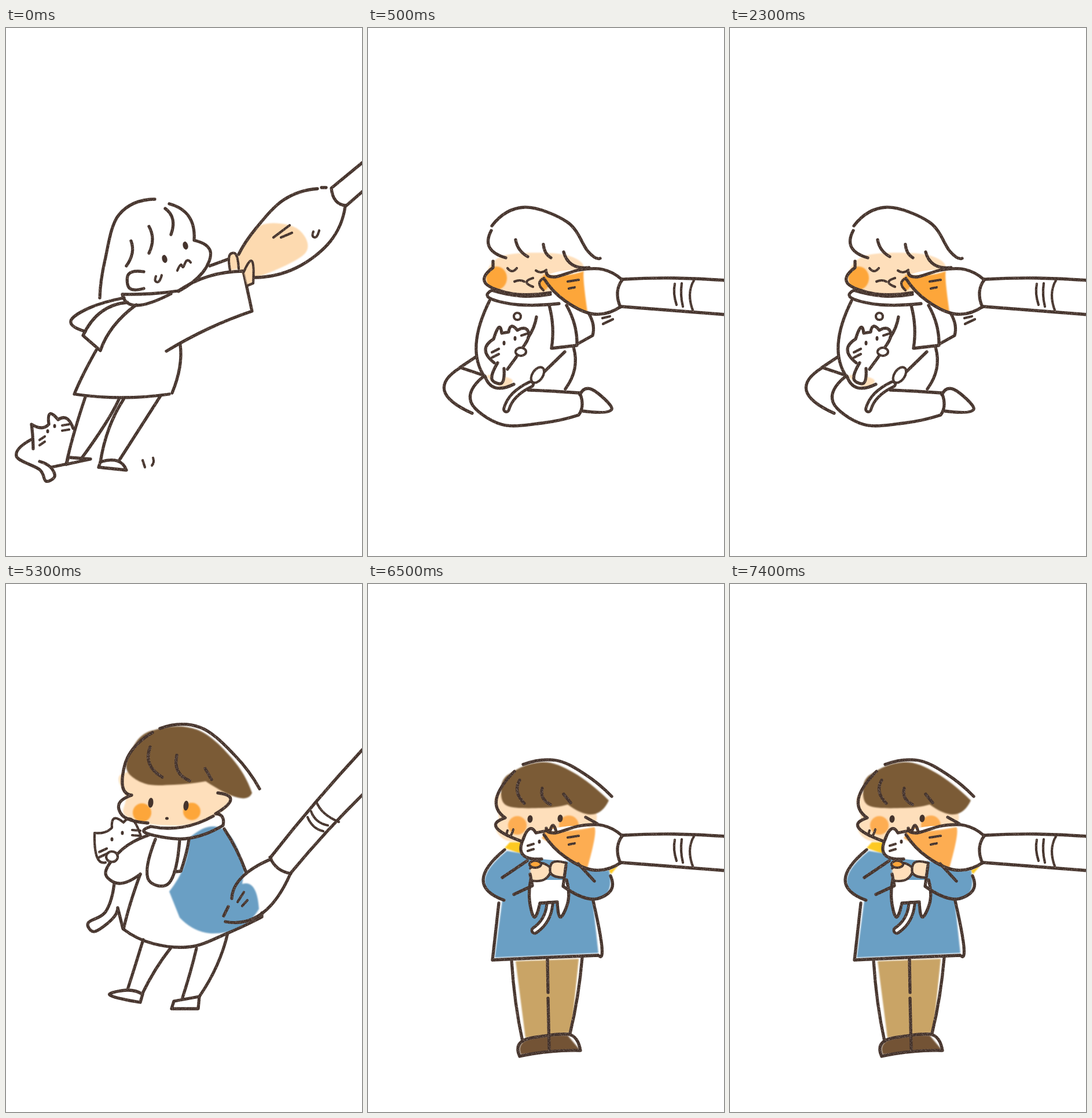
An HTML page with a canvas that plays this animation: 615 px wide and 910 px high, repeating every 8 s.

```html
<!DOCTYPE html>
<html lang="en">
<head>
<meta charset="utf-8">
<title>Painting a friend</title>
<style>
html, body { margin: 0; width: 100%; height: 100%; overflow: hidden; background: #fff; }
canvas { display: block; }
</style>
</head>
<body>
<canvas id="stage" width="615" height="910"></canvas>
<script>
const ctx = document.getElementById('stage').getContext('2d');
const PEACH = '#fedfbb', ORANGE = '#fda63a', SOFT_ORANGE = '#fdad52', PALE = '#fddab0',
      BROWN = '#7b5b36', BLUE = '#6a9fc4', YELLOW = '#fdc922', TAN = '#c9a466',
      SHOE = '#735335', WHITE = '#fff', DARK = '#45342d';
const INK = crayon();

// Crayon grain: dark brown with seeded lighter specks.
function crayon() {
  const tile = document.createElement('canvas'), t = tile.getContext('2d');
  tile.width = tile.height = 96;
  t.fillStyle = DARK;
  t.fillRect(0, 0, 96, 96);
  let seed = 7;
  const random = () => (seed = seed * 16807 % 2147483647) / 2147483647;
  for (let i = 0; i < 3000; i++) {
    t.fillStyle = `rgba(160,142,132,${random() * 0.6})`;
    t.fillRect(random() * 96 | 0, random() * 96 | 0, 1, 1);
  }
  return ctx.createPattern(tile, 'repeat');
}

// Adds a spline through the points; open ends continue as a parabola.
function addSpline(path, pts, closed) {
  const n = pts.length;
  const beyond = (a, b, c) => a.map((v, k) => 3 * v - 3 * b[k] + (c || b)[k] - (c ? 0 : v - b[k]));
  const at = i => closed ? pts[(i + n) % n]
    : i < 0 ? beyond(pts[0], pts[1], pts[2])
    : i >= n ? beyond(pts[n - 1], pts[n - 2], pts[n - 3]) : pts[i];
  for (let i = 0; i < (closed ? n : n - 1); i++) {
    const [a, b, c, d] = [i - 1, i, i + 1, i + 2].map(at);
    path.bezierCurveTo(...b.map((v, k) => v + (c[k] - a[k]) / 6),
                       ...c.map((v, k) => v - (d[k] - b[k]) / 6), ...c);
  }
}

// "x,y x,y" is smooth, "|" makes the point before it a corner, a final "z" closes a round loop.
function curve(text) {
  const path = new Path2D();
  let corner;
  for (const part of text.replace('z', '').split('|')) {
    const pts = part.trim().split(/\s+/).map(s => s.split(',').map(Number));
    if (corner) pts.unshift(corner);
    else path.moveTo(...pts[0]);
    addSpline(path, pts, text.endsWith('z'));
    corner = pts[pts.length - 1];
  }
  return path;
}

function oval(x, y, rx, ry = rx, turn = 0) {
  const path = new Path2D();
  path.ellipse(x, y, rx, ry, turn, 0, 7);
  return path;
}

const toPath = shape => typeof shape === 'string' ? curve(shape) : shape;

function paint(color, ...shapes) {
  ctx.fillStyle = color;
  ctx.filter = color === WHITE ? 'none' : 'blur(0.8px)';
  shapes.forEach(s => ctx.fill(toPath(s)));
  ctx.filter = 'none';
}

function stroke(style, width, shapes) {
  ctx.strokeStyle = style;
  ctx.lineWidth = width;
  shapes.forEach(s => ctx.stroke(toPath(s)));
}
const ink = (...shapes) => stroke(INK, 5.3, shapes);
const thin = (...shapes) => stroke(INK, 4.2, shapes);
const figure = (color, shape) => { paint(color, shape); thin(shape); };
const tube = (shape, width) => { stroke(INK, width + 5, [shape]); stroke(WHITE, width - 5, [shape]); };
const eyes = (rx, ry, turn, ...spots) =>
  spots.forEach(([x, y]) => { ctx.fillStyle = DARK; ctx.fill(oval(x, y, rx, ry, turn)); });
const whiskers = (x, y, dx, dy) =>
  [0, 9].forEach(k => thin(`${x},${y + k} ${x + dx},${y + dy + k}`));
const drop = (x, y) => thin(`${x},${y} ${x - 1},${y + 8} ${x + 5},${y + 9} ${x + 10},${y - 2}`);

function sideBrush(color, reach) {
  paint(WHITE, '310,425 370,417 438,433 | 437,480 390,493 310,440');
  paint(color, `303,425 340,426 ${reach},419 | ${reach},440 379,489 | 340,470 303,432`);
  ink('308,421 323,429 365,417 405,416 438,433', '304,432 340,470 390,493 437,480',
    '440,433 431,455 436,481', '441,433 530,431 618,435', '437,480 528,487 618,494');
  thin('530,441 529,458 533,477', '542,440 541,460 544,480', '563,435 556,460 562,489',
    '345,437 364,434', '347,449 357,447');
}

function pulling() {
  paint(PALE, '402,390 440,340 502,345 517,388 430,430 402,415 z');
  ink('257,295 195,322 171,400 162,465', '282,303 316,325 325,366 | 353,385 340,421 298,454',
    '275,311 288,330 285,356', '247,342 253,364 247,388', '216,367 218,388 208,410',
    '238,420 212,424 213,448 238,449');
  ink('298,453 250,458 201,459 | 226,478 285,458', '204,465 145,482 112,505 137,523',
    '210,473 165,489 133,530 | 163,556 | 186,514 225,477',
    '298,453 350,428 410,419 | 425,488 | 350,518 277,557',
    '156,555 134,596 118,631 | 200,637 282,631', '301,546 300,585 287,629', '352,410 385,398');
  figure(PALE, '387,418 386,392 397,390 402,415');
  figure(PALE, '411,420 425,402 427,440 | 417,444');
  ink('402,390 432,345 480,296 538,277', '545,275 553,275', '430,430 500,414 560,368 586,307',
    '618,230 562,276 | 570,298 588,306 | 618,280');
  thin('462,361 490,340', '475,361 494,353', '236,745 240,757', '254,741 255,748 252,754',
    '296,418 302,408 306,412 312,401 319,404');
  drop(259, 428);
  drop(531, 351);
  eyes(4.5, 7, -0.25, [274, 398], [310, 375]);
  ink('137,636 117,700 104,752', '104,752 | 108,740 | 146,743 | 104,752', '195,640 171,683 131,741',
    '203,640 178,690 163,748 | 192,746 208,762 | 160,757 | 163,748', '267,634 195,746');
  ink('47,725 46,702 44,683 | 61,689 74,683 | 76,665 90,675 | 105,673 116,690',
    '44,709 18,738 58,761 69,781 84,773 77,757 58,747', '78,757 102,752');
  whiskers(97, 685, 12, -2);
  whiskers(67, 704, -9, 6);
  eyes(2.5, 3.5, 0, [84, 686], [72, 695]);
}

function kneeling() {
  paint(PEACH, '236,392 335,390 372,415 312,456 240,457 206,425 z', '205,600 235,621 250,608 232,600 z');
  paint(ORANGE, oval(222, 431, 18, 20), oval(304, 440, 8, 12));
  sideBrush(ORANGE, 373);
  ink('214,341 270,309 345,335 380,385 401,397', '213,349 210,378 238,396', '255,365 262,382 276,394',
    '303,373 307,387 316,396', '338,386 353,408 382,413', '216,402 216,413 | 203,440 250,458 315,456');
  thin('241,414 249,419 257,414', '290,418 299,421 308,417', '253,437 262,435 270,437',
    '285,431 274,438 285,446', '304,431 296,440 303,452', '405,500 418,497', '406,510 423,502');
  ink('315,459 265,462 214,452 | 211,466 260,477 330,475',
    '313,478 319,515 317,552 | 361,547 | 357,512 343,478', '361,545 388,530 | 389,512 382,493',
    '210,470 187,545 202,602', '291,498 286,516 277,533', '355,550 357,587 341,622', '340,558 304,593',
    '186,567 159,585 | 198,598', '160,585 132,625 180,664',
    '199,601 178,645 230,683 300,681 364,667 | 370,650 366,629 | 320,626 277,624',
    '366,632 387,623 421,657 370,660', '202,600 220,620 252,614');
  tube('281,614 253,633 239,657', 9);
  figure(WHITE, oval(293, 598, 9, 15, 0.6));
  thin(oval(258, 497, 6));
  paint(WHITE, '224,577 214,605 231,612 238,586');
  ink('218,577 203,555 217,536 | 226,516 231,526 | 243,524 | 248,514 258,521 | 272,518 278,530 267,551',
    '224,577 214,605 231,612 235,587', '241,588 257,566');
  figure(WHITE, oval(264, 558, 9, 7));
  whiskers(226, 553, -12, 6);
  thin('265,530 274,527');
  eyes(2.5, 4, 0, [235, 543], [254, 535]);
}

function carrying() {
  paint(PEACH, '206,325 207,370 205,398 250,414 325,413 386,380 365,335 z');
  paint(BROWN, '255,252 330,251 390,300 425,360 | 400,368 345,340 | 290,346 240,344 208,318 225,272 255,252');
  paint(ORANGE, oval(235, 394, 16), oval(321, 392, 15));
  paint(BLUE, '316,438 374,422 412,493 | 408,517 | 428,524 437,560 | 400,594 345,601 300,575 | 282,530 | 308,485 316,438');
  ink('253,256 212,295 201,345 217,364 | 195,380 205,402 245,412', '266,249 335,247 395,295 438,353',
    '249,281 248,310 270,333', '295,295 297,322 317,339', '344,318 355,337', '366,360 388,372 362,396');
  eyes(4.5, 8.5, 0.1, [250, 377], [311, 382]);
  eyes(3, 2.5, 0, [278, 404]);
  ink('358,400 305,419 250,418 | 244,430 310,439 375,416 | 374,402 364,396',
    '258,440 245,507 282,515 300,441', '316,440 311,465 302,495 | 291,496', '377,422 398,458 414,495',
    '232,500 215,550 203,595 | 255,620 320,625 380,603 442,574 | 442,567',
    '246,433 200,458 172,497 195,516 232,500',
    '187,516 172,565 142,584 153,599 183,578 193,558 | 202,594');
  thin('172,480 157,470 153,429 | 170,428 183,420 | 187,404 203,411 | 219,407 234,438');
  figure(WHITE, oval(183, 470, 10, 9));
  whiskers(174, 456, -13, 6);
  whiskers(218, 424, 14, 1);
  eyes(2.5, 3.5, 0, [183, 440], [201, 429]);
  ink('237,613 224,655 210,699', '284,628 258,665 235,707', '236,707 210,700 179,708 232,721 | 236,707',
    '329,628 318,670 304,716', '383,602 364,658 334,711', '334,711 290,719 | 286,732 | 332,732 | 334,711');
  ink('390,542 408,505 458,474', '384,556 376,572', '379,582 442,568 491,500', '456,471 470,490 492,499',
    '458,470 535,376 618,283', '492,498 554,427 618,361');
  thin('536,375 550,395 575,410', '527,392 538,408 556,416', '521,402 532,418 548,426',
    '411,531 400,548', '417,545 408,555');
}

function finishing() {
  paint(PEACH, '230,360 226,403 223,428 255,444 350,428 394,410 370,375 z');
  paint(BROWN, '240,330 300,307 355,325 416,373 | 388,397 345,380 | 300,386 240,382 230,352 240,330');
  paint(SOFT_ORANGE, oval(258, 416, 16), oval(347, 416, 17));
  paint(YELLOW, '236,455 | 245,445 | 265,445 | 267,466 | 236,455', '413,489 | 434,483 | 420,500');
  paint(BLUE, '240,460 202,510 232,545 | 219,644 | 398,636 | 388,545 | 415,530 416,492 | 345,478 240,460');
  paint(TAN, '255,650 | 364,646 | 351,773 | 272,782 | 255,650');
  paint(SHOE, '264,811 | 270,788 312,779 345,778 | 366,803 | 264,811');

  const catBody = '281,510 279,545 287,574 297,550 | 327,548 | 333,574 346,545 343,510';
  const catHead = '300,474 268,467 268,440 | 279,422 290,429 | 315,424 | 320,416 325,427';
  paint(WHITE, catBody, catHead + ' | 340,478 | 300,474');
  tube('314,552 306,578 288,597', 10);
  paint(WHITE, '300,535 | 325,535 | 325,546 | 300,546');
  paint(SOFT_ORANGE, '300,438 | 319,418 327,428 | 320,450');
  sideBrush(SOFT_ORANGE, 391);
  figure(PEACH, '280,490 300,481 316,492 305,509 281,511');
  figure(PEACH, '343,481 319,480 316,499 337,506');
  figure(ORANGE, oval(289, 483, 10, 6));

  ink('268,311 325,304 375,328 421,366', '253,323 222,370 237,403 | 222,420 264,443',
    '262,338 258,358 270,378', '301,352 302,368 315,380', '338,362 350,377', '376,402 396,413');
  eyes(4.5, 6.5, 0.1, [280, 405], [332, 404]);
  eyes(2.5, 3.5, 0, [296, 444]);
  drop(241, 425);
  whiskers(276, 451, 10, -3);
  ink('236,458 199,510 235,545', '275,477 232,506', '280,500 284,520 | 252,535',
    '342,485 337,521 | 385,543 418,530 419,503', '363,482 391,512',
    '226,550 215,648 | 300,644 398,640 | 404,625 389,546', catBody, catHead,
    '248,648 255,720 267,788', '370,644 362,710 349,775', '310,646 311,704', '311,714 313,801',
    '262,814 | 266,788 310,778 347,776 | 360,785 367,804 | 312,806 262,814');
}

const scenes = [[500, pulling], [3500, kneeling], [6500, carrying], [8000, finishing]];
let shown;
ctx.lineCap = ctx.lineJoin = 'round';

function tick() {
  const time = performance.now() % 8000;
  const draw = scenes.find(([end]) => time < end)[1];
  if (draw !== shown) {
    ctx.fillStyle = WHITE;
    ctx.fillRect(0, 0, 615, 910);
    draw();
    shown = draw;
  }
  requestAnimationFrame(tick);
}
tick();
</script>
</body>
</html>
```
